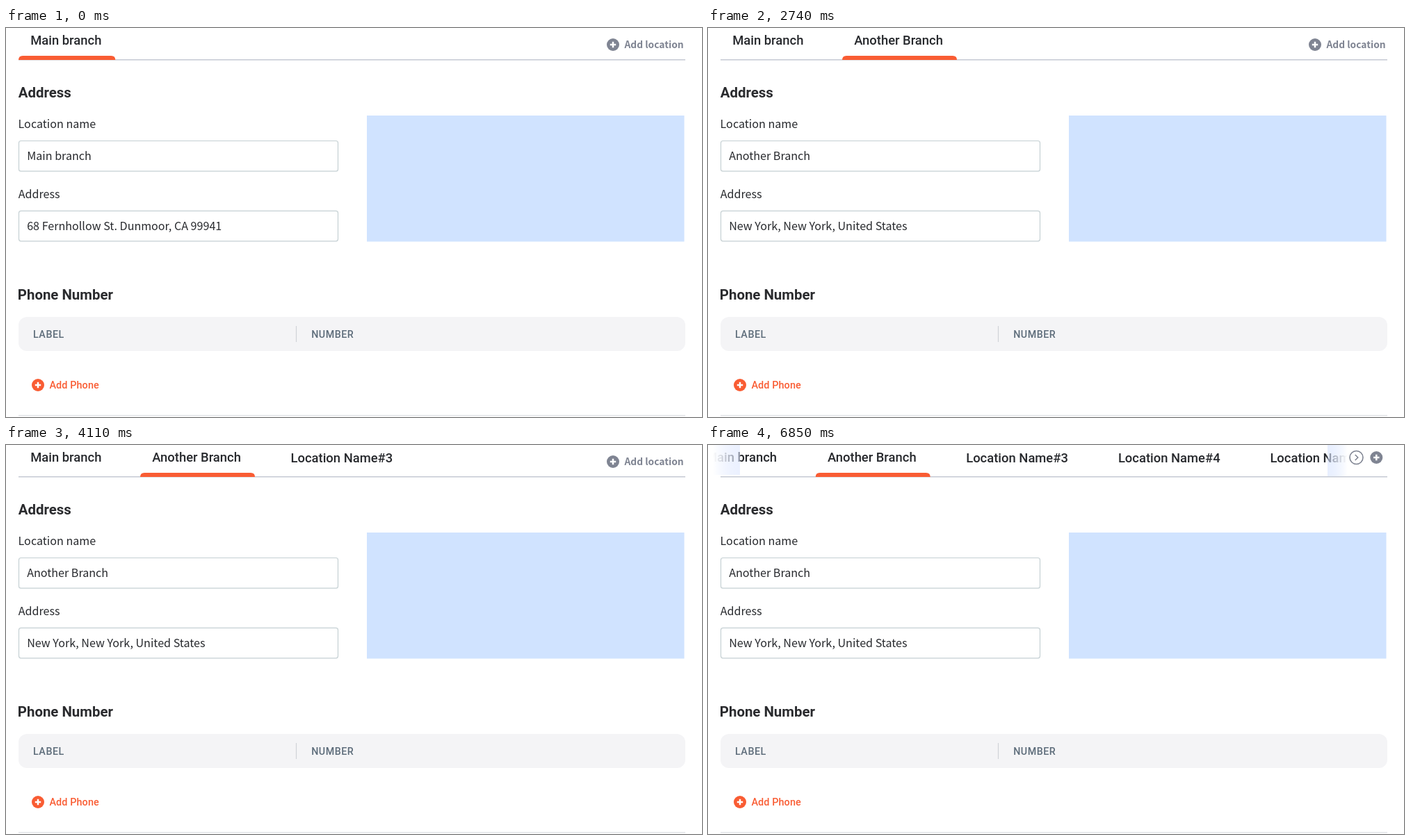
Animation of 1001x560 px, one loop 8 s. Source, as an HTML page:

```html
<!DOCTYPE html>
<html lang="en">
<head>
<meta charset="utf-8">
<title>Locations</title>
<style>
  html, body { margin: 0; width: 100%; height: 100%; overflow: hidden; background: #fff; }
  svg { display: block; width: 1001px; height: 560px; }
  text { white-space: pre; fill: #27292d; font: 400 16.1px "Noto Sans CJK SC", "Noto Sans CJK JP", "Noto Sans CJK", "Noto Sans", sans-serif; }
  .tab { font: 500 18.4px Roboto, sans-serif; }
  .head { font: 700 20.4px Roboto, sans-serif; fill: #2a2b2e; }
  .col { font: 500 14.3px Roboto, sans-serif; letter-spacing: .5px; fill: #5d6c7a; }
  .phone { font: 500 14.4px Roboto, sans-serif; letter-spacing: .1px; fill: #f95c33; }
  .add { font-size: 13.8px; font-weight: 700; fill: #7f8492; }
  .hint { fill: #808487; }
  .box { fill: #fff; stroke: #c5d0d3; stroke-width: 1.2; }
</style>
</head>
<body>
<svg viewBox="0 0 1001 560">
  <defs>
    <linearGradient id="fadeL">
      <stop offset=".15" stop-color="#fff"/>
      <stop offset="1" stop-color="#dbe5ff" stop-opacity=".55"/>
    </linearGradient>
    <linearGradient id="fadeR">
      <stop offset="0" stop-color="#d5e2ff" stop-opacity=".55"/>
      <stop offset=".9" stop-color="#fff"/>
    </linearGradient>
    <g id="plus">
      <circle r="9" fill="currentColor"/>
      <path d="M-4.2 0H4.2M0-4.2V4.2" stroke="#fff" stroke-width="2.5"/>
    </g>
  </defs>

  <g id="tabs"></g>

  <g id="addWide">
    <use href="#plus" x="873" y="24" color="#7f8492"/>
    <text class="add" x="889.5" y="29.3">Add location</text>
  </g>
  <g id="scroller">
    <rect width="46" height="43" fill="url(#fadeL)"/>
    <rect x="891" width="32" height="45" fill="url(#fadeR)"/>
    <rect x="922" width="79" height="45" fill="#fff"/>
    <g fill="none" stroke="#7f8492" stroke-width="1.6">
      <circle cx="932.5" cy="18" r="9.5"/>
      <path d="M930.7 14l4 4-4 4"/>
    </g>
    <use href="#plus" x="961.3" y="18" color="#7f8492"/>
  </g>
  <path d="M18 45.7H977" stroke="#c5c9d3" stroke-width="1.4"/>
  <path id="bar" fill="#f95c33"/>

  <text class="head" x="17.8" y="100.3">Address</text>
  <text x="17.6" y="144">Location name</text>
  <rect class="box" x="18.5" y="162.5" width="459" height="43.7" rx="3"/>
  <text id="name" x="30.2" y="190"></text>
  <text x="17.8" y="245">Address</text>
  <rect class="box" x="18.5" y="263.4" width="459" height="43.4" rx="3"/>
  <text id="address" x="30.2" y="291"></text>
  <rect x="519" y="126" width="456.5" height="181.5" fill="#d0e3ff"/>

  <text class="head" x="16.8" y="390.8">Phone Number</text>
  <rect x="18" y="416" width="959" height="49" rx="12" fill="#f4f4f6"/>
  <text class="col" x="39" y="445.6">LABEL</text>
  <path d="M417.5 429V452" stroke="#cfd3d8" stroke-width="1.2"/>
  <text class="col" x="439.2" y="445.6">NUMBER</text>
  <use href="#plus" x="46" y="514" color="#f95c33"/>
  <text class="phone" x="62.4" y="519.2">Add Phone</text>
  <path d="M18 557.8H977" stroke="#e2e4e8" stroke-width="1.6"/>
</svg>
<script>
const $ = id => document.getElementById(id);
const LOOP = 8000, HOLD = 1370;
const tabX = [35.2, 210.3, 409.5, 628.2, 846.7];
const extra = ["Location Name#3", "Location Name#4", "Location Name#5"];

const first = { tabs: ["Main branch"], bar: [18, 157.3], name: "Main branch", address: "68 Fernhollow St. Dunmoor, CA 99941" };
const blank = { tabs: ["Main branch", "Location Name #2"], bar: [193, 381], name: "Location name #2", address: "", hint: true };
const branch = (count, shift = 0) => ({
  tabs: ["Main branch", "Another Branch", ...extra.slice(0, count)],
  bar: [193, 358], name: "Another Branch", address: "New York, New York, United States", shift
});
const states = [first, blank, branch(0), branch(1), branch(2), branch(3, -38.3)];

function show({ tabs, bar: [left, right], name, address, hint, shift = 0 }) {
  $("tabs").innerHTML = tabs.map((label, i) =>
    `<text class="tab" x="${tabX[i] + shift}" y="${i < 2 ? 24.4 : 25}">${label}</text>`).join("");
  $("bar").setAttribute("d", `M${left + shift} 46q0-6 6-6H${right + shift - 6}q6 0 6 6z`);
  $("name").textContent = name;
  $("name").setAttribute("class", hint ? "hint" : "");
  $("address").textContent = address;
  $("addWide").style.display = shift ? "none" : "";
  $("scroller").style.display = shift ? "" : "none";
}

let current = -1;
function tick(now) {
  const step = Math.floor(now % LOOP / HOLD);
  if (step !== current) show(states[current = step]);
  requestAnimationFrame(tick);
}
show(states[current = 0]);
requestAnimationFrame(tick);
</script>
</body>
</html>
```
